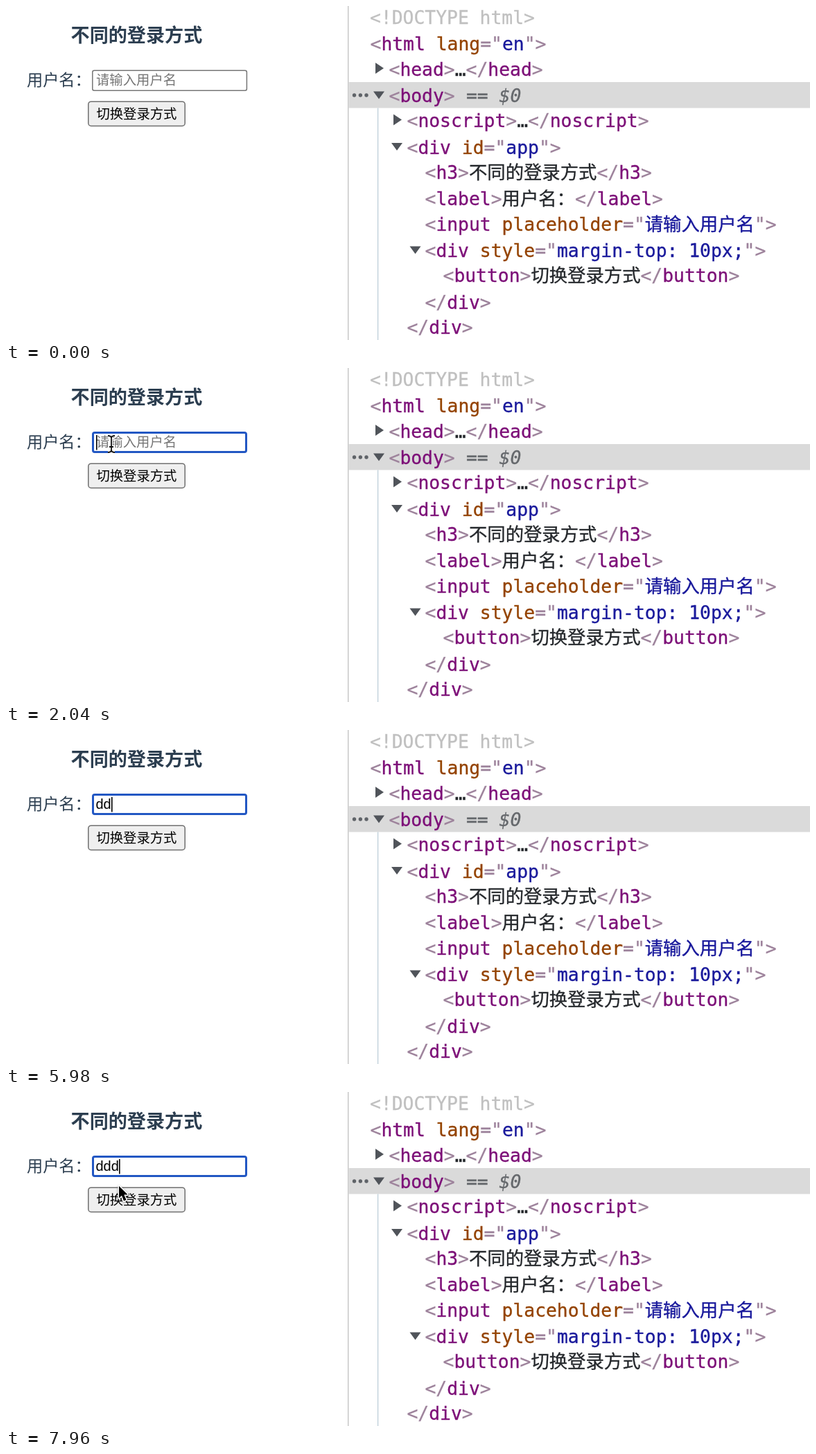
Animation, 1160 px wide and 483 px high, one loop 8 s. Source, as an HTML page:

```html
<!DOCTYPE html>
<html lang="zh-CN">
<head>
<meta charset="utf-8">
<style>
  html, body { margin: 0; width: 100%; height: 100%; overflow: hidden; background: #fff; }
  svg { display: block; width: 1160px; height: 483px; }
  text { white-space: pre; font-family: "Noto Sans CJK SC", "Noto Sans CJK", sans-serif; }
  .code text { font: 26.35px "DejaVu Sans Mono", "Noto Sans CJK SC", monospace; }
  .code tspan, .state { fill: currentColor; stroke: currentColor; stroke-width: .35px; }
  .doctype { color: #c0c0c0; }
  .mark { color: #9d829b; }
  .tag { color: #7d1078; }
  .attr { color: #944300; }
  .value { color: #1a1a9c; }
  .plain { color: #25282c; }
  .state { color: #65686c; }
</style>
</head>
<body>
<svg viewBox="0 0 1160 483">
  <text x="93.6" y="51.5" font-size="27.1" font-weight="700" fill="#2c3e50">不同的登录方式</text>
  <text x="30" y="114.7" font-size="23.2" fill="#2c3e50">用户名：</text>
  <rect id="field" fill="#fff"/>
  <text id="hint" x="130" y="114.3" font-size="19.35" fill="#757575">请输入用户名</text>
  <text id="typed" x="129.5" y="114.3" style="font:20px 'Liberation Sans',sans-serif"></text>
  <rect id="caret" y="97" width="1.6" height="21.5"/>
  <rect x="118.8" y="138.2" width="139.4" height="35.2" rx="4" fill="#efefef" stroke="#6f6f6f" stroke-width="1.5"/>
  <text x="130.4" y="163" font-size="19.35">切换登录方式</text>

  <rect x="493" width="1.4" height="483" fill="#c4c4c4"/>
  <rect x="494.4" y="110" width="666" height="37.5" fill="#dadada"/>
  <rect x="536" y="147.5" width="1.2" height="336" fill="#b9cbd6"/>
  <g fill="#5f6368">
    <circle cx="502.5" cy="129" r="2.7"/><circle cx="511.3" cy="129" r="2.7"/><circle cx="520" cy="129" r="2.7"/>
  </g>
  <path fill="#50545a" d="M533 82l12 8l-12 8zM559 156.500l12 8l-12 8zM530 123.500h16l-8 11zM556 198h16l-8 11zM582.500 347.500h16l-8 11z"/>
  <g class="code" id="code">
    <text class="state" x="664" y="139">== <tspan font-style="italic">$0</tspan></text>
  </g>

  <path id="arrow" d="M0 0V17.500L4 13.700L7 21.500L10.500 20L7.300 12.500H12.700Z" stroke="#fff" stroke-width="3"
    stroke-linejoin="round" paint-order="stroke" style="filter:drop-shadow(0 1.500px 1.500px #0006)"/>
  <defs>
    <path id="beamShape" d="M-5 -12Q-.5 -12 0 -9Q.5 -12 5 -12M0 -9V9M-3 4H3M-5 12Q-.5 12 0 9Q.5 12 5 12"/>
  </defs>
  <g id="beam" fill="none">
    <use href="#beamShape" stroke="#fff" stroke-width="4"/>
    <use href="#beamShape" stroke="#111" stroke-width="1.8"/>
  </g>
</svg>
<script>
const $ = id => document.getElementById(id);
const set = (el, attrs) => { for (const k in attrs) el.setAttribute(k, attrs[k]); };
const show = (el, on) => set(el, { visibility: on ? 'visible' : 'hidden' });

function make(name, parent, attrs, text = '') {
  const el = document.createElementNS('http://www.w3.org/2000/svg', name);
  set(el, attrs);
  el.textContent = text;
  return parent.appendChild(el);
}

// Each line: indent in x, then markup to be coloured by token.
const lines = [
  [525, '<!DOCTYPE html>'],
  [525.5, '<html lang="en">'],
  [552.5, '<head>…</head>'],
  [552.5, '<body>'],
  [578.5, '<noscript>…</noscript>'],
  [578.5, '<div id="app">'],
  [604.5, '<h3>不同的登录方式</h3>'],
  [604.5, '<label>用户名：</label>'],
  [604.5, '<input placeholder="请输入用户名">'],
  [604.5, '<div style="margin-top: 10px;">'],
  [630.5, '<button>切换登录方式</button>'],
  [604.5, '</div>'],
  [578.5, '</div>']
];
const kinds = ['doctype', 'mark', 'tag', 'attr', 'value', 'plain'];
const token = /(<!.+)|(<\/?|="|"?>)|((?<=<\/?)\w+)|([\w-]+(?=="))|((?<==")[^"]*)|(\s+|[^<>"\s]+)/g;
lines.forEach(([x, markup], i) => {
  // Odd rows sit one pixel lower.
  const row = make('text', $('code'), { x, y: 26 + 37.33 * i + i % 2 });
  for (const [word, ...groups] of markup.matchAll(token))
    make('tspan', row, { class: kinds[groups.findIndex(g => g !== undefined)] }, word);
});

// Pointer path: time, x, y.
const path = [
  [30, 205, 490], [660, 147, 166], [820, 148, 164], [920, 148, 163],
  [1660, 151, 113], [2000, 152, 110], [6560, 152, 110],
  [6940, 159, 112], [7360, 159, 117], [7960, 163, 136]
];
function pointer(t) {
  const n = path.findIndex(p => p[0] > t);
  if (n < 0) return path.at(-1).slice(1);
  if (!n) return null;
  const [t0, x0, y0] = path[n - 1], [t1, x1, y1] = path[n];
  let k = (t - t0) / (t1 - t0);
  k *= k * (3 - 2 * k);
  return [x0 + (x1 - x0) * k, y0 + (y1 - y0) * k];
}

const keyTimes = [4720, 5140, 6240];

function draw(t) {
  const focused = t >= 1960;
  const count = keyTimes.filter(k => t >= k).length;
  set($('field'), focused
    ? { x: 125.5, y: 93.5, width: 221, height: 28, rx: 2.5, stroke: '#2257c3', 'stroke-width': 3 }
    : { x: 124.8, y: 93.2, width: 222.6, height: 29, rx: 2.5, stroke: '#767676', 'stroke-width': 1.5 });
  show($('hint'), !count);
  $('typed').textContent = 'd'.repeat(count);
  set($('caret'), { x: 130 + 11 * count });
  show($('caret'), focused && (t < 3060 || t >= 4580));

  const pos = pointer(t);
  const visible = pos && (t < 4720 || t >= 6560);
  const inField = visible && pos[1] > 92 && pos[1] < 123;
  show($('arrow'), visible && !inField);
  show($('beam'), inField);
  if (visible) set($(inField ? 'beam' : 'arrow'), { transform: `translate(${pos})` });
}

const start = performance.now();
function tick() {
  draw((performance.now() - start) % 8000);
  requestAnimationFrame(tick);
}
tick();
</script>
</body>
</html>
```
